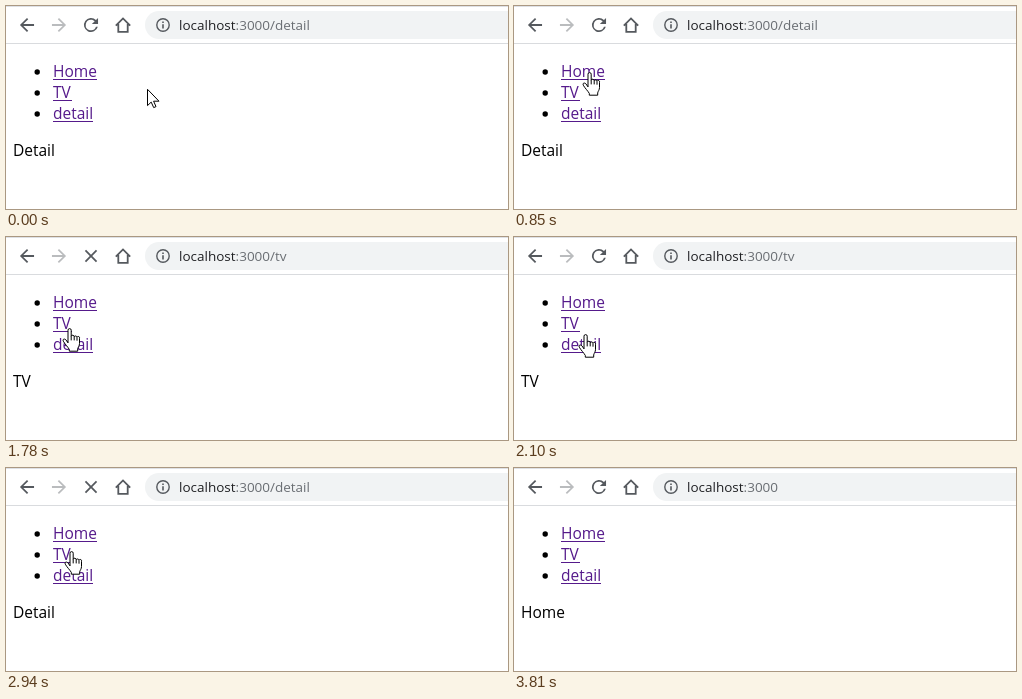
An HTML page that plays this animation: 502 px wide and 203 px high, repeating every 4.44 s.

```html
<!DOCTYPE html>
<html lang="en">
<head>
<meta charset="utf-8">
<title>Router demo</title>
<style>
  html, body { margin: 0; width: 100%; height: 100%; overflow: hidden; background: #fff; }
  svg { display: block; width: 502px; height: 203px; }
  text { font-family: "Open Sans", "Noto Sans", sans-serif; font-size: 15.5px; }
  .url { font-size: 13.5px; fill: #202124; }
  .path { fill: #6a6e73; }
  .icon { fill: #55595e; }
  .line { fill: none; stroke: #55595e; stroke-width: 2; }
  .link { fill: #551a8b; }
  .cursor { fill: #fff; stroke: #000; stroke-linejoin: round; stroke-linecap: round; }
</style>
</head>
<body>
<svg viewBox="0 0 502 203">
  <rect width="502" height="203" fill="#fff"/>
  <rect width="502" height="1" fill="#dee1e6"/>
  <rect y="37" width="502" height="1" fill="#d9dbde"/>
  <rect x="139" y="5" width="400" height="28" rx="14" fill="#f1f3f4"/>

  <path id="back" class="icon" transform="translate(10.44 8.44) scale(.88)"
    d="M20 11H7.83l5.59-5.59L12 4l-8 8 8 8 1.41-1.41L7.83 13H20z"/>
  <path class="icon" style="fill:#babcbe" transform="translate(63.56 8.44) scale(-.88 .88)"
    d="M20 11H7.83l5.59-5.59L12 4l-8 8 8 8 1.41-1.41L7.83 13H20z"/>
  <g class="icon" transform="translate(74.44 8.44) scale(.88)">
    <path id="reload" d="M17.65 6.35A8 8 0 1 0 19.73 14h-2.08A6 6 0 1 1 12 6c1.66 0 3.14.69 4.22 1.78L13 11h7V4z"/>
    <path id="stop" d="M19 6.41 17.59 5 12 10.59 6.41 5 5 6.41 10.59 12 5 17.59 6.41 19 12 13.41 17.59 19 19 17.59 13.41 12z"/>
  </g>
  <path class="line" style="stroke-width:1.8" d="M109.8 19.6 117 12.4l7.2 7.2M112.3 18v7.9h9.4V18"/>
  <circle class="line" style="stroke-width:1.4" cx="157" cy="19" r="6.2"/>
  <path class="icon" d="M156.2 18.2h1.6v4.2h-1.6zM156.2 15.4h1.6v1.6h-1.6z"/>

  <text class="url" x="173" y="24">localhost<tspan class="path">:3000<tspan id="route"></tspan></tspan></text>
  <g id="menu"></g>
  <text id="page" x="7" y="150"></text>

  <g id="cursor" class="cursor">
    <path id="arrow" d="M.5.7V16.6L4.2 13.1 6.7 18.6 9 17.6 6.6 12.2h5z"/>
    <g id="hand">
      <path d="M6 14.5V2.2a1.6 1.6 0 0 1 3.2 0V8.2a1.55 1.55 0 0 1 3 .5 1.5 1.5 0 0 1 2.8.6 1.3 1.3 0 0 1 2.5 1v5.2c0 2.5-1.5 3.7-1.8 5.4v2.3H7.3v-1.8C5.8 18.8 2.8 16 1.3 13.2c-1-1.9 1-3 2.4-1.6z"/>
      <path fill="none" d="M9.2 8.5v3.5M12.2 9v3M15 9.8v2.5"/>
    </g>
  </g>
</svg>
<script>
const LOOP = 4440;
const el = id => document.getElementById(id);

const pages = {
  home: ["", "Home"],
  tv: ["/tv", "TV"],
  detail: ["/detail", "Detail"]
};

// [start ms, page]
const visits = [[0, "detail"], [1160, "home"], [1700, "tv"], [2400, "detail"], [3020, "tv"], [3570, "home"]];

// [start ms, end ms]
const loads = [[1000, 1470], [1630, 2020], [2320, 2630], [2940, 3170], [3490, 3730]];

// [start ms, shape, left, top]
const moves = [
  [0, "arrow", 141, 83], [70, "arrow", 136, 80], [150, "arrow", 118, 68],
  [220, "arrow", 90, 52], [300, "arrow", 62, 43], [370, "hand", 40, 55],
  [450, "hand", 60, 65], [520, "hand", 74, 69], [610, "hand", 73, 68],
  [690, "hand", 72, 67], [770, "hand", 70, 66], [850, "hand", 68, 66],
  [930, "hand", 60, 70], [1000, "hand", 50, 78], [1080, "hand", 51, 83],
  [1160, "hand", 52, 83], [1700, "hand", 53, 85], [1780, "hand", 56, 91],
  [1870, "hand", 61, 95], [1940, "hand", 63, 97], [2020, "hand", 64, 97],
  [2550, "hand", 61, 90], [2630, "hand", 58, 83], [3020, "hand", 59, 81],
  [3090, "hand", 61, 74], [3170, "hand", 62, 67], [3240, "hand", 63, 64],
  [3340, "hand", 62, 63], [3810, "none", 0, 0]
];

["Home", "TV", "detail"].forEach((label, i) => {
  const y = 71 + 21 * i, width = [44, 19, 40][i];
  el("menu").innerHTML +=
    `<circle cx="31.2" cy="${y - 5}" r="2.7"/>
     <text class="link" x="47" y="${y}">${label}</text>
     <rect class="link" x="47" y="${y + 2}" width="${width}" height="1"/>`;
});

const current = (steps, t) => steps.findLast(step => step[0] <= t);
const show = (id, on) => el(id).style.display = on ? "" : "none";

function draw(t) {
  const [route, text] = pages[current(visits, t)[1]];
  el("route").textContent = route;
  el("page").textContent = text;

  const loading = loads.some(([from, to]) => t >= from && t < to);
  show("stop", loading);
  show("reload", !loading);

  const [, shape, x, y] = current(moves, t);
  show("arrow", shape === "arrow");
  show("hand", shape === "hand");
  el("cursor").setAttribute("transform", `translate(${x} ${y})`);
}

const start = performance.now();
function tick() {
  draw((performance.now() - start) % LOOP);
  requestAnimationFrame(tick);
}
tick();
</script>
</body>
</html>
```
